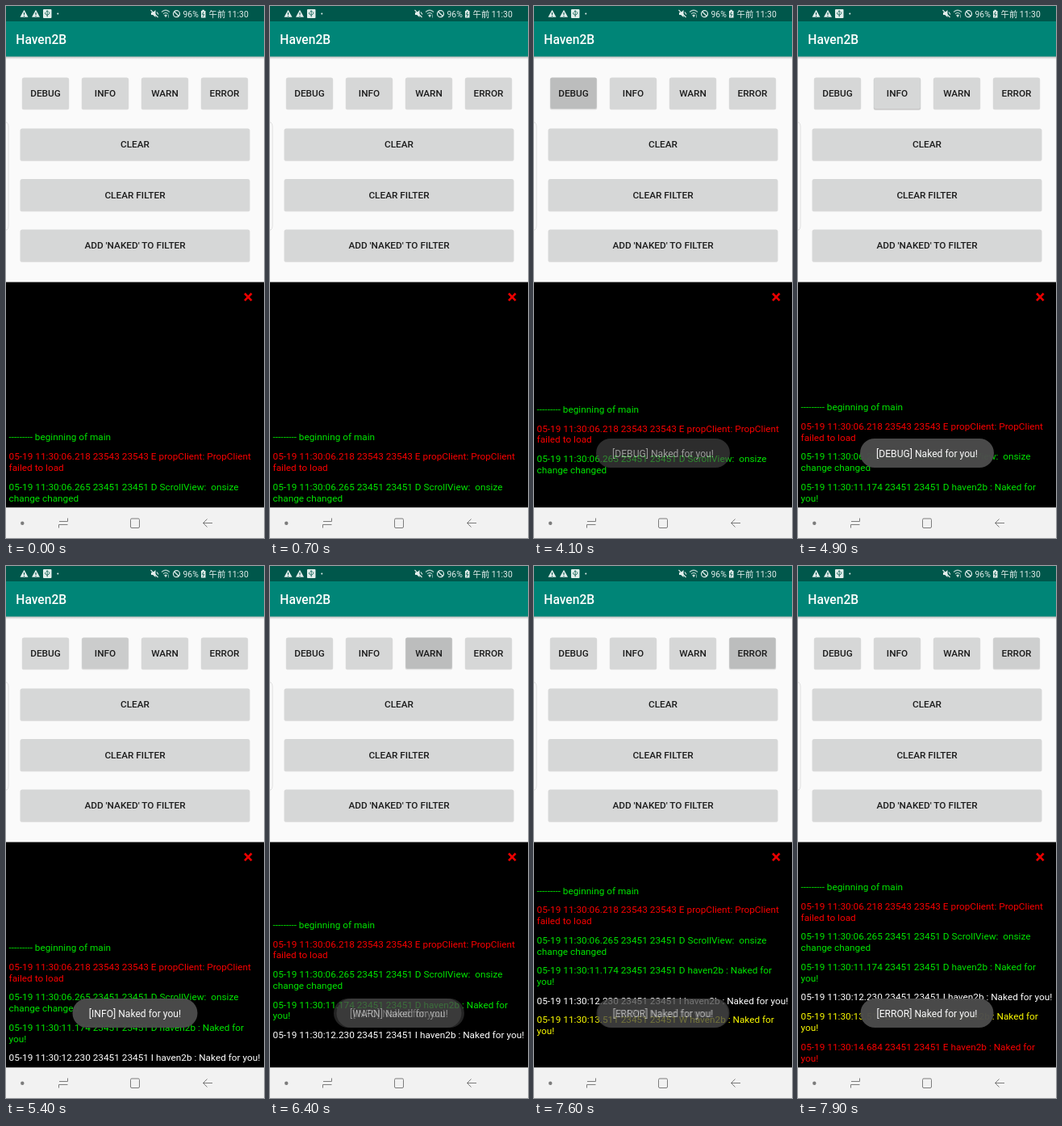
An HTML page that plays this animation: 320x658 px, repeating every 8 s.

```html
<!DOCTYPE html>
<html lang="en">
<head>
<meta charset="utf-8">
<title>Log console</title>
<style>
  html, body { margin: 0; width: 100%; height: 100%; overflow: hidden; background: #000; }
  svg { display: block; width: 100vw; height: 100vh; }
  text { font: 400 11.8px Roboto, "Noto Sans CJK JP", "Noto Sans", sans-serif; white-space: pre; }
  .label { font-weight: 500; text-anchor: middle; fill: #1c1c1c; }
  .toast { font-size: 12.1px; text-anchor: middle; fill: #fafafa; }
  .status { font-size: 10.4px; fill: #e2eeec; }
</style>
</head>
<body>
<svg id="stage" viewBox="0 0 320 658" xmlns="http://www.w3.org/2000/svg"></svg>
<script>
const LOOP = 8000;
const ONE_LINE = 23.7, TWO_LINES = 37.5, LINE = 13.8, LOG_BOTTOM = 620;
const GREEN = '#00e400', RED = '#f80000', WHITE = '#ffffff', YELLOW = '#fafa00';
const ICON = '#e2eeec', STATUS_BAR = '#00574b';
const stage = document.getElementById('stage');

function add(parent, tag, attrs = {}, text) {
  const node = document.createElementNS('http://www.w3.org/2000/svg', tag);
  for (const key in attrs) node.setAttribute(key, attrs[key]);
  if (text !== undefined) node.textContent = text;
  parent.appendChild(node);
  return node;
}
const rect = (x, y, width, height, fill, more = {}, parent = stage) =>
  add(parent, 'rect', { x, y, width, height, fill, ...more });
const path = (d, more = {}) => add(stage, 'path', { d, fill: 'none', ...more });
const clamp = v => Math.max(0, Math.min(1, v));
const ease = v => (1 - Math.cos(Math.PI * clamp(v))) / 2;

// Backgrounds
rect(0, 0, 320, 658, '#fafafa');
const shade = add(add(stage, 'defs'), 'linearGradient', { id: 'shade', x2: 0, y2: 1 });
add(shade, 'stop', { offset: 0, 'stop-color': '#707070', 'stop-opacity': .5 });
add(shade, 'stop', { offset: 1, 'stop-color': '#707070', 'stop-opacity': 0 });
rect(0, 62, 320, 4, 'url(#shade)');
rect(0, 0, 320, 19, STATUS_BAR);
rect(0, 19, 320, 43.5, '#008577');
rect(0, 341.5, 320, 279, '#000');
rect(0, 620.5, 320, 37.5, '#f2f2f2');

// Status bar
for (const x of [22.5, 37]) {
  path(`M${x} 4.8l5 9h-10z`, { fill: ICON });
  path(`M${x} 8v3m0 1v1`, { stroke: STATUS_BAR, 'stroke-width': 1.1 });
}
rect(46, 4, 10.5, 11, ICON, { rx: 1 });
path('M51.2 13.5V5.8m-1.5 1.5 1.5-1.6 1.5 1.6M48.7 8v1.8l2.5 1.7 2.500-1.900V7.500',
  { stroke: STATUS_BAR, 'stroke-width': .8 });
add(stage, 'circle', { cx: 64.3, cy: 9.5, r: 1, fill: ICON });
path('M180 8h2.2l3.3-3v9l-3.3-3H180z', { fill: ICON });
path('M179.5 5l9 9M187 7.5l2 3', { stroke: ICON, 'stroke-width': 1.1 });
path('M193 7.5q5-4.5 10 0M195 9.8q3-2.8 6 0', { stroke: '#a8c8c2', 'stroke-width': 1.2 });
path('M196.5 11.5q1.7-1.4 3.2 0l-1.6 2.2zM201.5 10.5v4', { fill: ICON, stroke: '#a8c8c2', 'stroke-width': .7 });
add(stage, 'circle', { cx: 211.5, cy: 9.7, r: 4, fill: 'none', stroke: ICON, 'stroke-width': 1.2 });
path('M208.7 7l5.6 5.5', { stroke: ICON, 'stroke-width': 1.2 });
add(stage, 'text', { x: 219.5, y: 13.7, class: 'status' }, '96%');
path('M242 6h1.3V4.8h2.6V6h1.6v8.5H242z', { fill: ICON });
path('M245.2 7l-1.8 3.3h2.4l-1.8 3', { stroke: STATUS_BAR, 'stroke-width': .9 });
add(stage, 'text', { x: 251.5, y: 13.7, class: 'status' }, '午前 11:30');

add(stage, 'text', { x: 12.3, y: 46.7, fill: '#fff', style: 'font-size:15.6px;font-weight:500' }, 'Haven2B');

// Buttons
function button(label, x, y, width, height) {
  rect(x - .5, y + .4, width + 1, height + .9, '#909090', { rx: 2, opacity: .3 });
  const lift = rect(x - .5, y + .5, width + 1, height + 1.6, '#808080', { rx: 2.5, opacity: 0 });
  rect(x, y, width, height, '#d6d7d7', { rx: 2 });
  const ripple = rect(x, y, width, height, '#000', { rx: 2, opacity: 0 });
  add(stage, 'text', { x: x + width / 2, y: y + height / 2 + 4.4, class: 'label' }, label);
  return { lift, ripple };
}
const levels = ['DEBUG', 'INFO', 'WARN', 'ERROR'];
const keys = levels.map((level, i) => button(level, 20.3 + i * 74, 88.5, 57.4, 38.5));
['CLEAR', 'CLEAR FILTER', "ADD 'NAKED' TO FILTER"].forEach((label, i) =>
  button(label, 18, 151.5 + i * 62.5, 284, 39));

path('M-1 144H1q2 1 2 5v123q0 4-2 5h-2', { fill: '#fcfcfc', stroke: '#dcdcdc', 'stroke-width': .9 });
path('M296 355.5l8.6 8.8m0-8.8l-8.6 8.8', { stroke: '#e80000', 'stroke-width': 2.6 });

// Log entries: the first three are there from the start
const entries = [
  { lines: ['--------- beginning of main'], color: GREEN },
  { lines: ['05-19 11:30:06.218 23543 23543 E propClient: PropClient', 'failed to load'], color: RED },
  { lines: ['05-19 11:30:06.265 23451 23451 D ScrollView:  onsize', 'change changed'], color: GREEN },
  { lines: ['05-19 11:30:11.174 23451 23451 D haven2b : Naked for', 'you!'], color: GREEN, at: 3896 },
  { lines: ['05-19 11:30:12.230 23451 23451 I haven2b : Naked for you!'], color: WHITE, at: 4952 },
  { lines: ['05-19 11:30:13.511 23451 23451 W haven2b : Naked for', 'you!'], color: YELLOW, at: 6233 },
  { lines: ['05-19 11:30:14.684 23451 23451 E haven2b : Naked for', 'you!'], color: RED, at: 7406 }
];
for (const entry of entries) {
  entry.height = entry.lines.length > 1 ? TWO_LINES : ONE_LINE;
  entry.node = add(stage, 'g', { fill: entry.color });
  entry.lines.forEach((line, i) => add(entry.node, 'text', { x: 3.6, y: 16.2 + i * LINE }, line));
}
const taps = entries.filter(entry => entry.at).map(entry => entry.at);

// Toasts
const toastWidths = [166, 155, 162, 165];
const toasts = levels.map((level, i) => {
  const node = add(stage, 'g', { opacity: 0 });
  const width = toastWidths[i];
  rect(160 - width / 2, 535, width, 36, '#4c4c4c', { rx: 18, opacity: .97 }, node);
  add(node, 'text', { x: 160, y: 557.8, class: 'toast' }, `[${level}] Naked for you!`);
  return node;
});

// Navigation bar
const navLine = { stroke: '#7c7c7c', 'stroke-width': 1 };
add(stage, 'circle', { cx: 20.3, cy: 639.7, r: 2.2, fill: '#7c7c7c' });
path('M66 637.5H76.500V633.500M76.500 641.500H65.500V645.500', navLine);
rect(154.5, 634, 11, 11.5, 'none', { rx: 1.5, ...navLine });
path('M256 639.5H244.5M249.5 634.5l-5 5 5 5', navLine);

function render(t) {
  let y = LOG_BOTTOM;
  for (let i = entries.length - 1; i >= 0; i--) {
    const { at, height, node } = entries[i];
    const age = at ? t - at : Infinity;
    // Older rows slide up first, then the new row fades in.
    const top = age < 250 ? LOG_BOTTOM - height : y - height;
    node.setAttribute('transform', `translate(0 ${top.toFixed(2)})`);
    node.setAttribute('opacity', clamp((age - 250) / 120));
    y -= height * ease(age / 250);
  }
  taps.forEach((at, i) => {
    const age = t - at;
    const next = i + 1 < taps.length ? t - taps[i + 1] : -1;
    const pressed = clamp((age + 20) / 150) * (1 - clamp((age - 250) / 350));
    const raised = clamp((age + 130) / 100) * (1 - clamp((age - 20) / 130));
    keys[i].ripple.setAttribute('opacity', .12 * pressed);
    keys[i].lift.setAttribute('opacity', .25 * raised);
    toasts[i].setAttribute('opacity', clamp((age - 20) / 300) * (1 - clamp((next - 20) / 350)));
  });
}

const start = performance.now();
function tick() {
  render((performance.now() - start) % LOOP);
  requestAnimationFrame(tick);
}
render(0);
requestAnimationFrame(tick);
</script>
</body>
</html>
```
